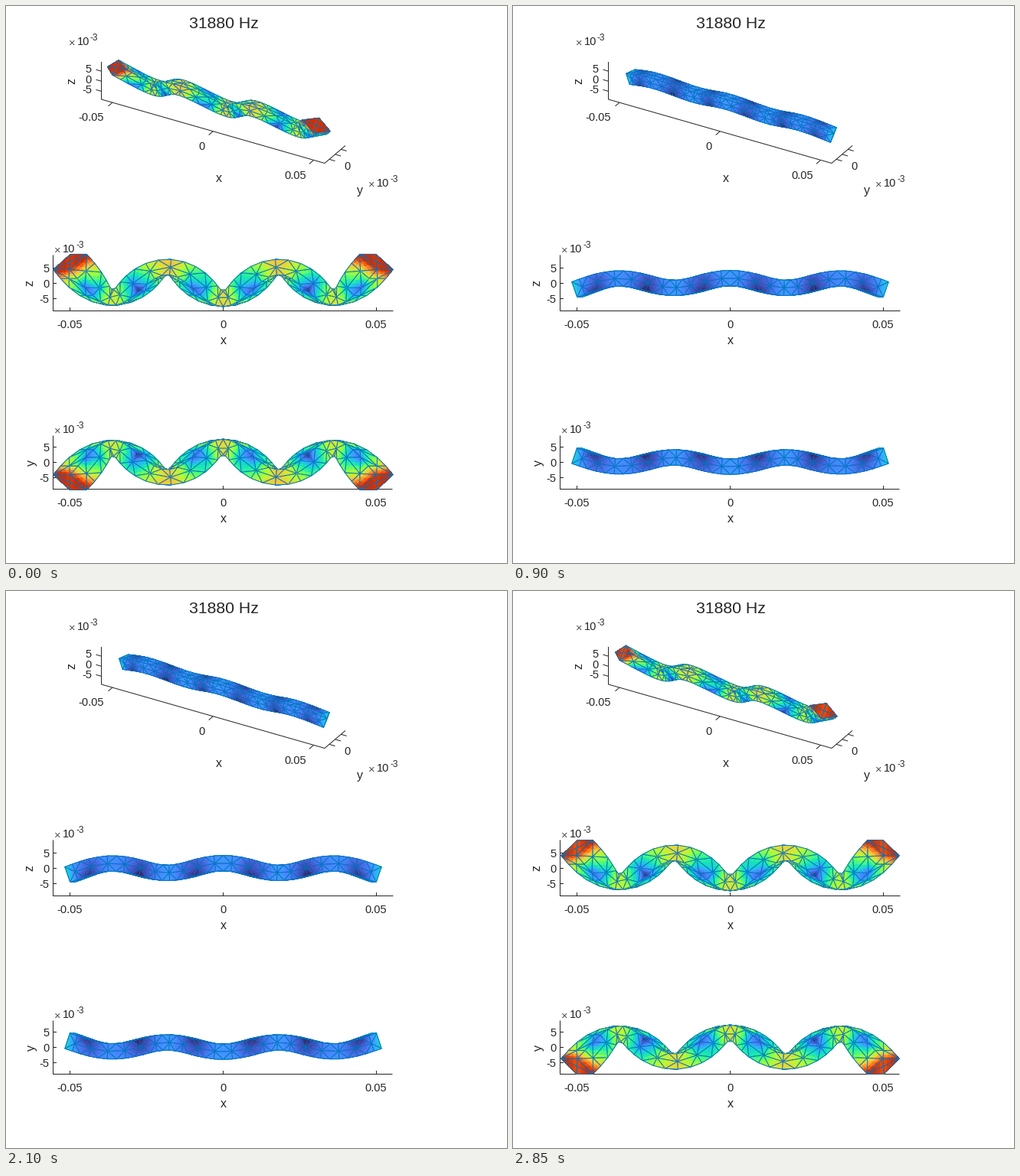
These frames come from a looping animation (654 px wide and 728 px high, 3 s). A matplotlib script:

```python
import numpy as np
import matplotlib
import matplotlib.pyplot as plt
from matplotlib.animation import FuncAnimation
from matplotlib.collections import PolyCollection

W, H, DPI = 654, 728, 100
PX = 72 / DPI                      # one pixel in points
FRAMES, INTERVAL = 20, 150
INK, EDGE = "#262626", (0, 0.447, 0.741, 1)
HALF, SIDE, CELLS = 50.0, 2.5, 20  # beam size in mm
TURBO = matplotlib.colormaps["turbo"]
C_MAX, C_CAP = 11.2, 0.88
Z_ROW, Y_ROW = 362.0, 596.1        # zero lines of the flat views

plt.rcParams["font.family"] = "Liberation Sans"


def build_mesh():
    """Surface mesh: fine corner edges, a coarser middle row, end caps."""
    corners = SIDE * np.array([(-1, -1), (1, -1), (1, 1), (-1, 1)])
    mids = (corners + np.roll(corners, -1, axis=0)) / 2
    xs = np.linspace(-HALF, HALF, 2 * CELLS + 1)
    nodes = [(x, *c) for x in xs for c in corners]
    nodes += [(x, *m) for x in xs[1::2] for m in mids]
    nodes += [(-HALF, 0, 0), (HALF, 0, 0)]
    first_mid = 4 * len(xs)
    first_cap = first_mid + 4 * CELLS

    def corner(i, k):
        return 4 * i + k % 4

    def mid(i, k):
        return first_mid + 4 * i + k

    tris = []
    for k in range(4):
        for i in range(CELLS):
            for side in (k, k + 1):
                for j in (2 * i, 2 * i + 1):
                    tris.append((corner(j, side), corner(j + 1, side),
                                 mid(i, k)))
                if i:
                    tris.append((corner(2 * i, side), mid(i - 1, k),
                                 mid(i, k)))
        for ring, cell, cap in ((0, 0, 0), (2 * CELLS, CELLS - 1, 1)):
            rim = corner(ring, k), corner(ring, k + 1)
            tris.append((*rim, mid(cell, k)))
            tris.append((*rim, first_cap + cap))

    nodes, tris = np.array(nodes, float), np.array(tris)
    # make every triangle wind outwards
    p = nodes[tris]
    normal = np.cross(p[:, 1] - p[:, 0], p[:, 2] - p[:, 0])
    centre = p.mean(axis=1) * (0.01, 1, 1)
    flip = (normal * centre).sum(axis=1) < 0
    tris[flip] = tris[flip][:, ::-1]
    return nodes, tris


def mode_shape(nodes):
    """Free-free bending close to the diagonal, with section rotation."""
    x, y, z = nodes.T
    k, q, wave, tail = 0.1726, 0.157, 5.1, 3.18
    angle = np.radians(46.3)
    dy, dz = -np.sqrt(2) * np.cos(angle), np.sqrt(2) * np.sin(angle)
    lift = -wave * np.cos(k * x) + tail * np.cosh(q * x) / np.cosh(q * HALF)
    turn = (0.94 * wave * k * np.sin(k * x)
            + tail * q * np.sinh(q * x) / np.cosh(q * HALF))
    return np.column_stack([-turn * (dy * y + dz * z), dy * lift, dz * lift])


def split_weights(n):
    """Barycentric weights of the n*n small triangles in one triangle."""
    def point(a, b):
        return a / n, b / n, (n - a - b) / n
    out = []
    for a in range(n):
        for b in range(n - a):
            out.append([point(a, b), point(a + 1, b), point(a, b + 1)])
            if a + b < n - 1:
                out.append([point(a + 1, b), point(a + 1, b + 1),
                            point(a, b + 1)])
    return np.array(out)


class View:
    """One projection of the beam, painted from back to front."""

    def __init__(self, ax, origin, matrix, toward):
        self.origin = np.array(origin)
        self.matrix = np.array(matrix)
        self.toward = np.array(toward)
        self.art = PolyCollection([], joinstyle="round", zorder=3)
        ax.add_collection(self.art, autolim=False)

    def draw(self, points, size):
        p = points[TRIS]
        normal = np.cross(p[:, 1] - p[:, 0], p[:, 2] - p[:, 0])
        seen = np.flatnonzero(normal @ self.toward > 1e-6)
        depth = p[seen].mean(axis=1) @ self.toward
        seen = seen[np.argsort(depth)]

        flat = self.origin + p[seen] @ self.matrix
        small = np.einsum("sij,tjd->tsid", WEIGHTS, flat)
        verts = np.concatenate([small, flat[:, None]], axis=1)
        level = size[TRIS[seen]] @ WEIGHTS.mean(axis=1).T
        fill = TURBO(np.minimum(level / C_MAX, C_CAP))
        count, parts = level.shape
        clear = np.zeros((count, 1, 4))
        edge = np.zeros((count, parts + 1, 4))
        edge[:, -1] = EDGE
        widths = np.zeros((count, parts + 1))
        widths[:, -1] = PX

        self.art.set_verts(verts.reshape(-1, 3, 2))
        self.art.set_facecolor(
            np.concatenate([fill, clear], axis=1).reshape(-1, 4))
        self.art.set_edgecolor(edge.reshape(-1, 4))
        self.art.set_linewidth(widths.ravel())
        self.art.set_antialiased((widths > 0).ravel())


def text(x, y, s, size=14.67, ha="center", **kw):
    """Text whose digits are centred on y."""
    ax.text(x, y + 0.36 * size, s, fontsize=size * PX, ha=ha,
            va="baseline", color=INK, **kw)


def side_label(x, y, s):
    ax.text(x, y, s, fontsize=16 * PX, ha="center", va="center",
            color=INK, rotation=90)


def exponent(x, y):
    text(x, y + 1, "×", 14.67, "left", alpha=0.8)
    text(x + 11, y, "10", 14.67, "left")
    text(x + 28, y - 5.5, "-3", 11.7, "left")


def line(*pts):
    xs, ys = zip(*pts)
    ax.plot(xs, ys, color=INK, lw=PX, solid_capstyle="butt", zorder=1,
            snap=False)


def flat_axes(top, bottom, zero, right, name, name_x):
    left = 61.5
    line((left, top), (left, bottom), (right, bottom))
    for value, label in ((-50, "-0.05"), (0, "0"), (50, "0.05")):
        x = 283.5 + 4 * value
        line((x, bottom), (x, bottom - 4.5))
        text(x - 0.5, bottom + 17, label)
    for value in (5, 0, -5):
        y = np.floor(zero - 4 * value) + 0.5
        line((left, y), (left + 4.5, y))
        text(56.5, y + 0.3, str(value), ha="right")
    text(283.5, bottom + 37.5, "x", 16)
    side_label(name_x, zero + 0.5, name)
    exponent(63, top - 8.5)


def solid_axes():
    line((124.5, 73), (124.5, 122), (416, 205.5), (443, 182.5))
    for value in (5, 0, -5):
        y = 98.3 - 2.624 * value
        line((124.5, y), (117.5, y - 2))
        text(112, y - 3, str(value), ha="right")
    for value, label, lx, ly in ((-50, "-0.05", 111, 145),
                                 (0, "0", 256, 183),
                                 (50, "0.05", 377.5, 221)):
        x, y = 270.2 + 2.624 * value, 163.8 + 0.755 * value
        line((x, y), (x - 5.5, y + 4.8))
        text(lx, ly, label)
    for value in (-5, 0, 5):
        x, y = 429.6 + 1.515 * value, 193.8 - 1.312 * value
        line((x, y), (x + 7.5, y + 2.2))
    text(446, 209, "0")
    text(278, 224, "x", 16)
    text(462, 240, "y", 16)
    side_label(86, 98, "z")
    exponent(82, 46)
    exponent(473, 231)


NODES, TRIS = build_mesh()
SHAPE = mode_shape(NODES)
SIZE = np.linalg.norm(SHAPE, axis=1)
WEIGHTS = split_weights(4)

fig = plt.figure(figsize=(W / DPI, H / DPI), dpi=DPI, facecolor="white")
ax = fig.add_axes([0, 0, 1, 1])
ax.set_xlim(0, W)
ax.set_ylim(H, 0)
ax.axis("off")

text(284, 21.3, "31880 Hz", 21.33)
solid_axes()
flat_axes(325.5, 398.5, Z_ROW, 505.5, "z", 31)
flat_axes(561.5, 631.5, Y_ROW, 504.5, "y", 33)

views = [
    View(ax, (284.0, 127.7),
         [(2.624, 0.7575), (1.515, -1.312), (0, -2.624)],
         (0.433, -0.75, 0.5)),
    View(ax, (283.5, Z_ROW), [(4, 0), (0, 0), (0, -4)], (0, -1, 0)),
    View(ax, (283.5, Y_ROW), [(4, 0), (0, -4), (0, 0)], (0, 0, 1)),
]


def update(frame):
    swing = np.cos(2 * np.pi * frame / FRAMES)
    points = NODES + swing * SHAPE
    for view in views:
        view.draw(points, abs(swing) * SIZE)
    return [view.art for view in views]


anim = FuncAnimation(fig, update, frames=FRAMES, interval=INTERVAL,
                     repeat=True, repeat_delay=0, blit=False)
plt.show()
```
